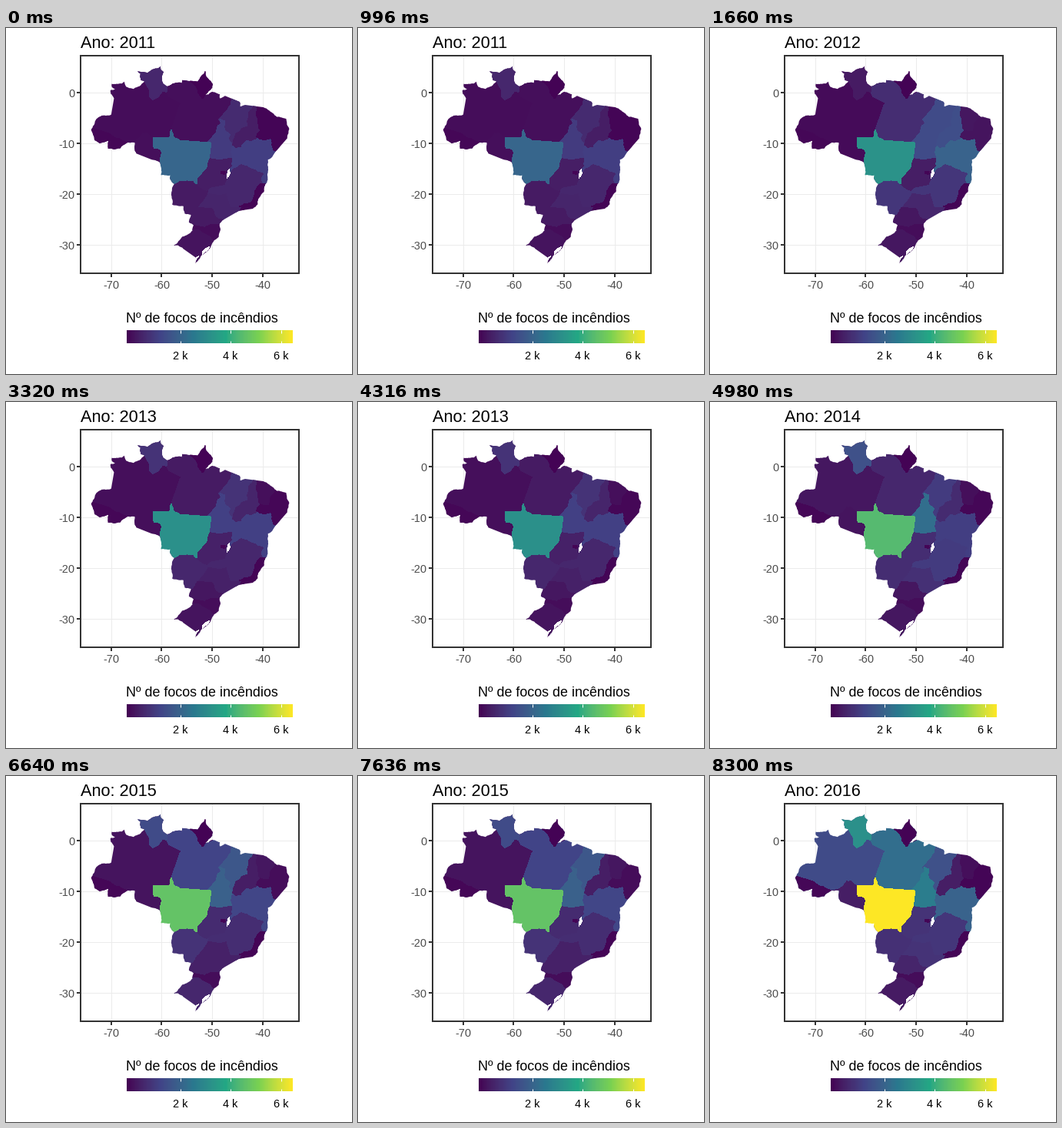
A matplotlib script that plays this animation: 450x450 px, repeating every 9.96 s.

```python
import numpy as np
import matplotlib.pyplot as plt
from matplotlib.animation import FuncAnimation
from matplotlib.colors import ListedColormap
from matplotlib.patches import Polygon, Rectangle

plt.rcParams["font.family"] = "Liberation Sans"

SIZE, DPI = 450, 100
PX = 72 / DPI
GREY, TEXT = "#333333", "#4D4D4D"
SCALE = 6.587  # pixels per degree
YEARS = 6
rng = np.random.default_rng(7)

fig = plt.figure(figsize=(SIZE / DPI, SIZE / DPI), dpi=DPI, facecolor="white")
ax = fig.add_axes([0, 0, 1, 1])


def px(lon):
    return 597.6 + SCALE * lon


def py(lat):
    return 84.2 - SCALE * lat


def lab_ramp(stops, n=256):
    """Blend colour stops in CIE Lab space."""
    to_xyz = np.array([[.4124, .3576, .1805], [.2126, .7152, .0722], [.0193, .1192, .9505]])
    to_lab = np.array([[0, 116, 0], [500, -500, 0], [0, 200, -200]])
    white = to_xyz.sum(axis=1)
    lin = np.where(stops > .04045, ((stops + .055) / 1.055) ** 2.4, stops / 12.92)
    f = lin @ to_xyz.T / white
    f = np.where(f > .008856, np.cbrt(f), 7.787 * f + 16 / 116)
    lab = f @ to_lab.T
    t = np.linspace(0, len(stops) - 1, n)
    lab = np.column_stack([np.interp(t, np.arange(len(stops)), c) for c in lab.T])
    f = lab @ np.linalg.inv(to_lab).T
    f = np.where(f > .2069, f ** 3, (f - 16 / 116) / 7.787)
    lin = np.clip(f * white @ np.linalg.inv(to_xyz).T, 0, 1)
    return np.where(lin > .0031308, 1.055 * lin ** (1 / 2.4) - .055, 12.92 * lin)


cmap = ListedColormap(lab_ramp(plt.get_cmap("viridis")(np.linspace(0, 1, 6))[:, :3]))


def roughen(pts, longest=2.6):
    """Give border stretches a natural wiggle; very long ones stay straight."""
    for _ in range(3):
        out = []
        for a, b in zip(pts, np.roll(pts, -1, axis=0)):
            out.append(a)
            d = b - a
            if 0.35 < np.hypot(*d) < longest:
                out.append((a + b) / 2 + rng.uniform(-.1, .1) * np.array([-d[1], d[0]]))
        pts = np.array(out)
    return pts


def shape(coords, z, **style):
    pts = roughen(np.array(coords, float).reshape(-1, 2))
    patch = Polygon(np.c_[px(pts[:, 0]), py(pts[:, 1])], lw=0, antialiased=False,
                    zorder=z, **style)
    return ax.add_patch(patch)


def line(x, y, color, width, z):
    ax.plot(x, y, color=color, lw=width * PX, zorder=z, solid_capstyle="butt", snap=True)


def label(x, y, s, size, color="black", ha="center"):
    return ax.text(x, y, s, fontsize=size * PX, color=color, ha=ha, va="baseline", zorder=9)


north = [-73.9, -7.3, -73.2, -6, -72.9, -5.2, -71.8, -4.5, -69.95, -4.3, -69.4, -1.1,
         -70.05, -.2, -70.05, .55, -69.2, .7, -69.85, 1.2, -69.85, 1.75, -67.9, 1.8,
         -67.4, 2.2, -67, 1.2, -65.6, .75, -64.1, 1.5, -63.4, 2.3, -64.1, 2.5, -64.2, 3.8,
         -64.8, 4.2, -62.8, 3.9, -60.6, 4.9, -60.2, 5.25, -60.1, 4.5, -59.6, 4.1, -59.9, 2.7,
         -59.7, 1.8, -58.9, 1.25, -57.3, 1.95, -56, 1.9, -55.9, 2.5, -54.5, 2.3, -52.9, 2.2]
coast = [-52.3, 3.2, -51.4, 4.4, -51, 3, -49.9, 1.7, -50, 1, -51.4, -.5, -50.2, .1, -48.5, -.3,
         -48.5, -1.1, -47.5, -.6, -44.6, -1.8, -44.5, -2.7, -43.5, -2.4, -40, -2.85,
         -38.5, -3.75, -37.2, -4.8, -35.4, -5.15, -34.8, -7.2, -35.2, -9, -37.3, -11.4,
         -38.4, -12.9, -39, -13.2, -39, -15.5, -39.2, -17.7, -39.7, -18.5, -39.8, -19.6,
         -41, -21.3, -41, -22, -42, -22.9, -44.7, -23.3, -48, -25.2, -48.6, -26, -48.7, -28.4,
         -49.8, -29.4, -50.7, -31, -52.1, -32.1, -53.4, -33.75]
west = [-53.2, -32.6, -55.6, -30.9, -56.8, -30.1, -57.6, -30.2, -55.9, -28.4, -53.9, -27.2,
        -53.65, -26.2, -54.6, -25.6, -54.2, -24.1, -55.4, -23.9, -55.7, -22.4, -57.9, -22.1,
        -58.1, -20.2, -57.5, -18, -58.3, -17.1, -58.3, -16.3, -60.15, -16.25, -60.3, -13.8,
        -62.1, -13.15, -65, -12, -65.3, -9.8, -66.8, -9.85, -68.2, -11, -70.6, -11, -70.5, -9.5,
        -72.2, -10, -73.2, -9.4]
country = shape(north + coast + west, 2, visible=False)
states = []


def state(levels, *coords):
    """Add a state; levels are yearly percentages of the colour scale."""
    patch = shape(coords, 3 + len(states) * .01)
    patch.set_clip_path(country)
    states.append((patch, np.broadcast_to(levels, YEARS) / 100))


# Outer edges are cut by the country's outline, hidden ones by later states.
# Amazonas
state([2.5, 2, 3, 5, 4, 23], -75, 6, -55, 6, -55, -10, -75, -13)
# Pará
state([3, 12, 6, 10, 20, 36], -58.9, 3, -44, 3, -45, -6, -49, -11, -57.5, -9.5, -58.1, -7.35,
      -56.4, -2.5, -56.1, -2, -58.5, -.8, -58.9, 0)
# Amapá
state(.5, -54.8, 3, -49, 5, -49, .8, -51.2, -.3, -51.9, -1.15, -52.6, -.3, -53.1, 1.1)
# Roraima
state([10, 6, 14, 25, 23, 50], -66, 5, -60, 6, -59, 3, -58.9, .2, -59.9, .2, -60.5, -.7,
      -61.7, -1.4, -62.4, -.7, -62.3, .3, -62.8, 1.2, -63.4, 2.3, -66, 2.3)
# Acre
state(1.5, -75, -6.6, -70.6, -7.95, -68.6, -9, -66.8, -9.85, -68, -12, -75, -12)
# Rondônia
state([3, 2, 3, 4, 4, 7], -66.8, -9.85, -64.9, -9.3, -63.7, -8, -62.9, -8, -62, -8.8,
      -61.6, -8.8, -59.5, -10, -59.5, -14, -66, -14)
# Bahia
state([18, 32, 19, 18, 21, 32], -46.5, -9, -42, -8.3, -38, -8, -36, -12, -38, -18.5,
      -40.5, -18.5, -42, -16.5, -46.4, -15.6, -47, -13)
# Minas Gerais
state([10, 15, 10, 17, 12, 15], -46, -15.2, -44.3, -14.2, -42.5, -14.9, -41, -15.7, -39.9, -16,
      -40.5, -17.1, -40, -18.5, -41, -21.3, -44.5, -23.5, -47, -23, -51.4, -20.4,
      -51.3, -18.5, -47, -17)
# Maranhão
state([11, 23, 14, 17, 27, 25], -46.1, 0, -41.5, -2, -41.5, -5, -44, -9, -46, -10.3, -47.6, -8,
      -48.1, -6, -48.7, -5.3, -46.9, -3.2, -46.2, -1.6)
# Tocantins
state([17, 23, 19, 36, 31, 42], -48.5, -5.2, -47.5, -5.6, -47.6, -7.1, -46.5, -8.3, -46.8, -9,
      -46, -10.2, -46.4, -11.4, -46.1, -12.9, -47.5, -13.6, -50.6, -13.3, -51.2, -10,
      -49.3, -8, -49.1, -6.9, -48.3, -6)
# Piauí
state([7, 24, 9, 11, 7, 7], -41.8, -2, -41.2, -2, -41, -4, -40, -7, -40.7, -8.6, -42.5, -9.5,
      -43.3, -9.2, -44.4, -10.6, -45.3, -10.8, -46, -10.25, -45.4, -8.2, -43.5, -6.8,
      -42.9, -6.6, -42.9, -4.3, -42, -3)
# Ceará
state([1, 5, 3, 3, 5, 3], -41.3, -2, -37.2, -4, -37.5, -8, -40.5, -7.5, -41, -5.5, -41.3, -4)
# North-east coast
state([1, 4, 1.5, 1.5, 2.5, 1], -37.3, -4.5, -34, -4.5, -34, -9, -37, -12, -38, -11.2,
      -38.2, -9.3, -38.6, -9, -39.8, -9.3, -41.3, -8.7, -40.5, -7.4, -38.7, -7.7,
      -38.6, -6.4, -37.6, -5)
# Espírito Santo and Rio de Janeiro
state(1, -39, -18.3, -40.5, -17.9, -41.1, -18.5, -41.8, -20.6, -42.4, -21.7, -44.6, -22.4,
      -44.7, -24, -40, -24)
# São Paulo
state([9, 10, 8, 13, 8, 14], -51, -20, -49.3, -20.1, -47.3, -20, -46.5, -22.7, -44.3, -22.6,
      -44.7, -24, -47, -26, -49.3, -26, -53.4, -23, -53, -21)
# Paraná
state([6, 5, 5, 5, 8, 9], -53.2, -22.6, -50, -22.9, -49.3, -24.6, -47.8, -25.1, -48, -27,
      -54, -27, -55, -25.6, -54.2, -23.6)
# Mato Grosso do Sul
state([6, 15, 10, 12, 14, 13], -59, -16.8, -53.8, -16.8, -51, -19.2, -51, -20, -52, -21.5,
      -53.1, -22.6, -54.2, -24.1, -56, -24.5, -59, -22)
# Goiás
state([7, 7, 8, 12, 11, 14], -50.5, -12.9, -48.7, -13.3, -46.1, -12.9, -46.2, -14.5, -47, -15.2,
      -47.2, -17.2, -47.6, -18.1, -50.5, -18.7, -51, -19.3, -53.2, -18, -53, -16, -51.2, -13)
# Distrito Federal
state(1, -48.25, -15.5, -47.35, -15.5, -47.35, -16.05, -48.25, -16.05)
# Mato Grosso
state([33, 51, 50, 69, 73, 100], -61.6, -8.8, -58.4, -8.8, -58.1, -7.35, -57.6, -8.8,
      -56.5, -9.4, -50.2, -9.85, -50.6, -12.8, -51.2, -14.9, -53, -16.8, -53.1, -18,
      -53.8, -17.3, -56.2, -17.3, -57.5, -17.9, -61, -17, -60.3, -14, -60, -12,
      -60.3, -11.1, -61.5, -10.9)
# Santa Catarina
state(2.5, -54, -26.1, -51.4, -26.6, -50.5, -26.1, -48, -25.9, -48, -29, -49.7, -29.5, -54, -27)
# Rio Grande do Sul
state([4, 5, 4, 5, 10, 6], -54.5, -27.15, -52.5, -27.2, -50.4, -28.4, -49.7, -29.4, -49, -30,
      -53, -35, -59, -30)

# Coastal lagoons
shape([-50.6, -30.4, -51.3, -31.3, -52, -31.9, -51.9, -31.4, -51.3, -30.8], 4, color="white")
shape([-52.7, -32.3, -53.3, -33.1, -53.2, -32.6], 4, color="white")

# Panel, grid and axes
L, R, T, B = 97, 381, 36, 319
for lon in (-70, -60, -50, -40):
    line([px(lon)] * 2, [T, B], "#EBEBEB", 1, 1)
    line([px(lon)] * 2, [B, B + 5], GREY, 2, 8)
    label(px(lon), 339, str(lon), 14.5, TEXT)
for lat in (0, -10, -20, -30):
    line([L, R], [py(lat)] * 2, "#EBEBEB", 1, 1)
    line([L - 5, L], [py(lat)] * 2, GREY, 2, 8)
    label(89.5, py(lat) + 6, str(lat), 14.5, TEXT, "right")
ax.add_patch(Rectangle((L, T), R - L, B - T, fill=False, ec=GREY, lw=2 * PX, zorder=8))

# Legend
label(156, 383, "Nº de focos de incêndios", 17.9, ha="left")
ax.imshow(np.linspace(0, 1, 256)[None], cmap=cmap, extent=(157, 373, 410, 393),
          aspect="auto", interpolation="bilinear", zorder=2)
for k in (2, 4, 6):
    x = 226.7 + (k - 2) * 32.7
    line([x, x], [393, 396.5], "white", 1, 5)
    line([x, x], [406.5, 410], "white", 1, 5)
    label(x, 431, f"{k} k", 14.5)

title = label(97, 26, "", 21.8, ha="left")
ax.set_xlim(0, SIZE)
ax.set_ylim(SIZE, 0)
ax.axis("off")


def draw(i):
    title.set_text(f"Ano: {2011 + i}")
    for patch, levels in states:
        patch.set_facecolor(cmap(float(levels[i])))
    return [title] + [patch for patch, _ in states]


anim = FuncAnimation(fig, draw, frames=YEARS, interval=1660, repeat=True, repeat_delay=0,
                     init_func=lambda: draw(0))
plt.show()
```
